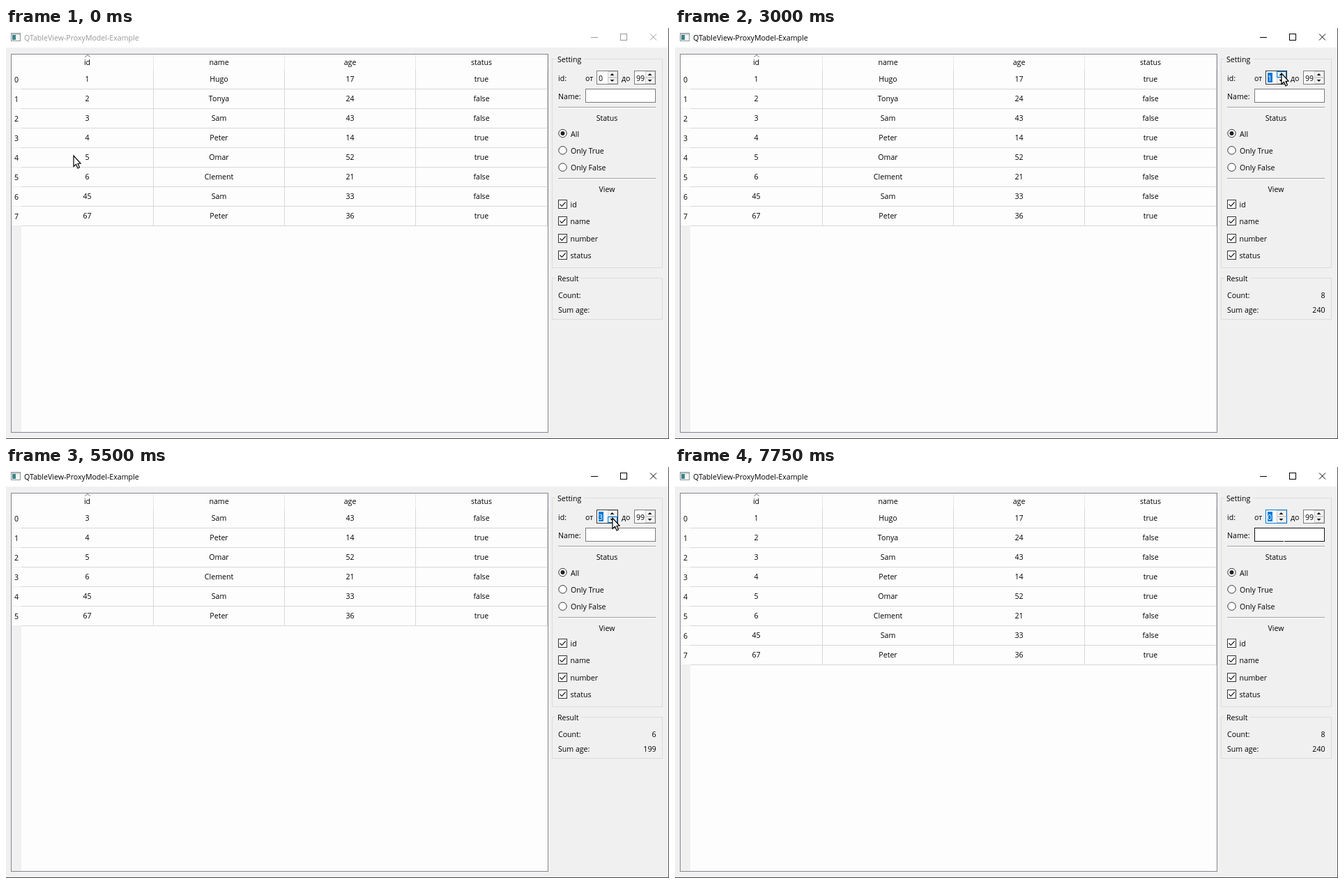
Write an HTML page with a canvas that moves like this. It is 951x589 px and loops after 8000 ms.

```html
<!DOCTYPE html>
<html lang="en">
<head>
<meta charset="utf-8">
<title>QTableView-ProxyModel-Example</title>
<style>
html, body { margin: 0; width: 100%; height: 100%; overflow: hidden; background: #f0f0f0; }
canvas { display: block; width: 951px; height: 589px; }
</style>
</head>
<body>
<canvas id="stage" width="951" height="589"></canvas>
<script>
const ctx = document.getElementById('stage').getContext('2d');
const LOOP = 8000, STEP = 250;
const INK = '#000', BLUE = '#0078d7', HOVER = '#d9ebf9', GRID = '#d8d8d8';
const columns = [
  { title: 'id', x: 116.5 }, { title: 'name', x: 305.5 },
  { title: 'age', x: 493.5 }, { title: 'status', x: 682 }
];
const people = [
  [1, 'Hugo', 17, true], [2, 'Tonya', 24, false], [3, 'Sam', 43, false], [4, 'Peter', 14, true],
  [5, 'Omar', 52, true], [6, 'Clement', 21, false], [45, 'Sam', 33, false], [67, 'Peter', 36, true]
];

// Each track lists [start time, value]; a value holds until the next one.
const tracks = {
  cursor: [[0, [97, 183]], [250, [111, 112]], [500, [127, 41]], [2000, [334, 62]],
    [2250, [565, 68]], [2500, [782, 70]], [2750, [870, 65]], [5250, [870, 73]],
    [7000, [871, 80]], [7250, null]],
  descending: [[0, false], [750, true], [1000, false], [1250, true], [1500, false]],
  from: [[0, 0], [3000, 1], [3500, 2], [4000, 3], [4500, 4], [5500, 3], [6000, 2], [6250, 1], [6500, 0]],
  active: [[0, false], [500, true]],
  headerHover: [[0, false], [500, true], [2000, false]],
  focus: [[0, ''], [750, 'table'], [3000, 'spin']],
  spinHover: [[0, ''], [2750, 'up'], [5250, 'down'], [7000, '']]
};

function valueAt(track, t) {
  let value = track[0][1];
  for (const [start, next] of track) if (t >= start) value = next;
  return value;
}

function fill(x, y, w, h, color) {
  ctx.fillStyle = color;
  ctx.fillRect(x, y, w, h);
}

function box(x, y, w, h, color, background) {
  if (background) fill(x, y, w, h, background);
  ctx.strokeStyle = color;
  ctx.lineWidth = 1;
  ctx.strokeRect(x + 0.5, y + 0.5, w - 1, h - 1);
}

function path(points, color, width = 1) {
  ctx.beginPath();
  points.forEach(([x, y]) => ctx.lineTo(x, y));
  ctx.strokeStyle = color;
  ctx.lineWidth = width;
  ctx.stroke();
}

function text(value, x, y, align = 'left', color = INK) {
  ctx.font = '500 10.6px "Open Sans", "Noto Sans", sans-serif';
  ctx.textAlign = align;
  ctx.fillStyle = color;
  ctx.fillText(value, x, y);
}

function drawTitleBar(active) {
  const color = active ? '#000' : '#999';
  fill(0, 0, 951, 28, '#fff');
  box(7, 7, 14, 12, '#8f979b', '#f4f6f6');
  fill(8, 8, 12, 2, '#c5cbce');
  fill(9, 10, 5, 7, '#3f8587');
  text('QTableView-ProxyModel-Example', 26, 17.5, 'left', color);
  fill(839, 13, 10, 1, color);
  box(881, 8, 10, 10, color);
  path([[924, 8.5], [933, 17.5]], color);
  path([[933, 8.5], [924, 17.5]], color);
}

function drawTable(rows, state) {
  box(7, 37, 771, 543, '#828790', '#fdfdfd');
  const bottom = 60 + rows.length * 28;
  fill(8, bottom, 14, 579 - bottom, '#f0f0f0');
  if (state.headerHover) fill(22, 38, 190, 21, HOVER);

  const tip = state.descending ? 41.5 : 38.5;
  const base = state.descending ? 38.5 : 41.5;
  path([[113.5, base], [117, tip], [120.5, base]], '#666');

  for (const x of [211, 399, 587, 776]) {
    fill(x, 38, 1, 22, '#e7e7e7');
    fill(x, 60, 1, bottom - 60, GRID);
  }
  columns.forEach(c => text(c.title, c.x, 53, 'center'));
  rows.forEach((row, i) => {
    const y = 77 + i * 28;
    fill(22, y + 10, 755, 1, GRID);
    fill(8, y + 10, 14, 1, '#eee');
    text(i, 15, y + 1, 'center');
    row.forEach((cell, c) => text(String(cell), columns[c].x, y, 'center'));
    if (state.focus === 'table' && row[0] === 1) {
      ctx.setLineDash([1, 1]);
      box(23, y - 17, 187, 27, '#111');
      ctx.setLineDash([]);
    }
  });
}

function drawGroup(title, y, height, gap) {
  box(783, y, 159, height, '#dcdcdc');
  fill(788, y, gap, 1, '#f0f0f0');
  text(title, 791, y + 4.5);
}

function triangle(x, y, direction) {
  ctx.beginPath();
  ctx.moveTo(x - 3, y + 1.5 * direction);
  ctx.lineTo(x + 3, y + 1.5 * direction);
  ctx.lineTo(x, y - 1.5 * direction);
  ctx.fillStyle = '#111';
  ctx.fill();
}

function drawSpin(x, value, focused = false, hover = '') {
  const border = hover ? '#333' : focused ? BLUE : '#7a7a7a';
  box(x, 61, 31, 20, border, '#fff');
  ['up', 'down'].forEach((part, i) => {
    const hot = hover === part;
    box(x + 16, 62 + i * 9, 14, 9, hot ? BLUE : '#d0d0d0', hot ? HOVER : '#f2f2f2');
    triangle(x + 22.5, 66.5 + i * 9, i ? -1 : 1);
  });
  if (focused) fill(x + 3, 64, 7, 14, BLUE);
  text(value, x + 3, 75.5, 'left', focused ? '#fff' : INK);
}

function drawSettings(state, hoverName) {
  drawGroup('Setting', 44, 300, 42);
  text('id:', 792, 75.5);
  text('от', 831, 75.5);
  text('до', 883, 75.5);
  drawSpin(847, state.from, state.focus === 'spin', state.spinHover);
  drawSpin(901, 99);
  text('Name:', 792, 101.5);
  box(831, 87, 101, 20, hoverName ? '#111' : '#7a7a7a', '#fff');
  for (const y of [113, 215]) {
    fill(792, y, 140, 1, '#a0a0a0');
    fill(792, y + 1, 140, 1, '#fff');
  }

  text('Status', 862, 133, 'center');
  ['All', 'Only True', 'Only False'].forEach((label, i) => {
    const y = 151 + i * 24.3;
    ctx.beginPath();
    ctx.arc(798.5, y, 5.7, 0, Math.PI * 2);
    ctx.fillStyle = '#fff';
    ctx.fill();
    ctx.strokeStyle = '#333';
    ctx.lineWidth = 1;
    ctx.stroke();
    if (!i) {
      ctx.beginPath();
      ctx.arc(798.5, y, 3, 0, Math.PI * 2);
      ctx.fillStyle = '#222';
      ctx.fill();
    }
    text(label, 810, y + 4.7);
  });

  text('View', 862, 235, 'center');
  ['id', 'name', 'number', 'status'].forEach((label, i) => {
    const y = Math.round(246 + i * 24.3);
    box(792, y, 13, 13, '#333', '#fff');
    path([[794.5, y + 6.5], [797.3, y + 9.3], [802.7, y + 3.5]], '#222', 1.2);
    text(label, 809.5, y + 11.3);
  });
}

function drawResult(rows, visible) {
  drawGroup('Result', 358, 60, 37);
  text('Count:', 792, 386.5);
  text('Sum age:', 792, 407.5);
  if (!visible) return;
  text(rows.length, 932.5, 386.5, 'right');
  text(rows.reduce((sum, row) => sum + row[2], 0), 932.5, 407.5, 'right');
}

function drawArrow([x, y]) {
  const outline = [[0, 0], [0, 15.5], [3.5, 12.3], [6, 18], [8.4, 16.8], [6, 11.3], [10, 11]];
  ctx.beginPath();
  outline.forEach(([dx, dy]) => ctx.lineTo(x + dx, y + dy));
  ctx.closePath();
  ctx.fillStyle = '#fff';
  ctx.fill();
  ctx.strokeStyle = '#000';
  ctx.lineWidth = 1.2;
  ctx.stroke();
}

function draw(time) {
  const t = Math.floor((time % LOOP) / STEP) * STEP;
  const state = {};
  for (const key in tracks) state[key] = valueAt(tracks[key], t);
  const rows = people.filter(([id]) => id >= state.from);
  if (state.descending) rows.reverse();
  const hoverName = !state.cursor;

  fill(0, 0, 951, 589, '#f0f0f0');
  drawTitleBar(state.active);
  drawTable(rows, state);
  drawSettings(state, hoverName);
  drawResult(rows, state.focus === 'spin');
  fill(950, 0, 1, 589, '#555');
  fill(0, 588, 951, 1, '#444');
  if (hoverName) fill(873, 98, 1, 10, '#fff');
  else drawArrow(state.cursor);
}

const began = performance.now();
function tick() {
  draw(performance.now() - began);
  requestAnimationFrame(tick);
}
tick();
</script>
</body>
</html>
```
